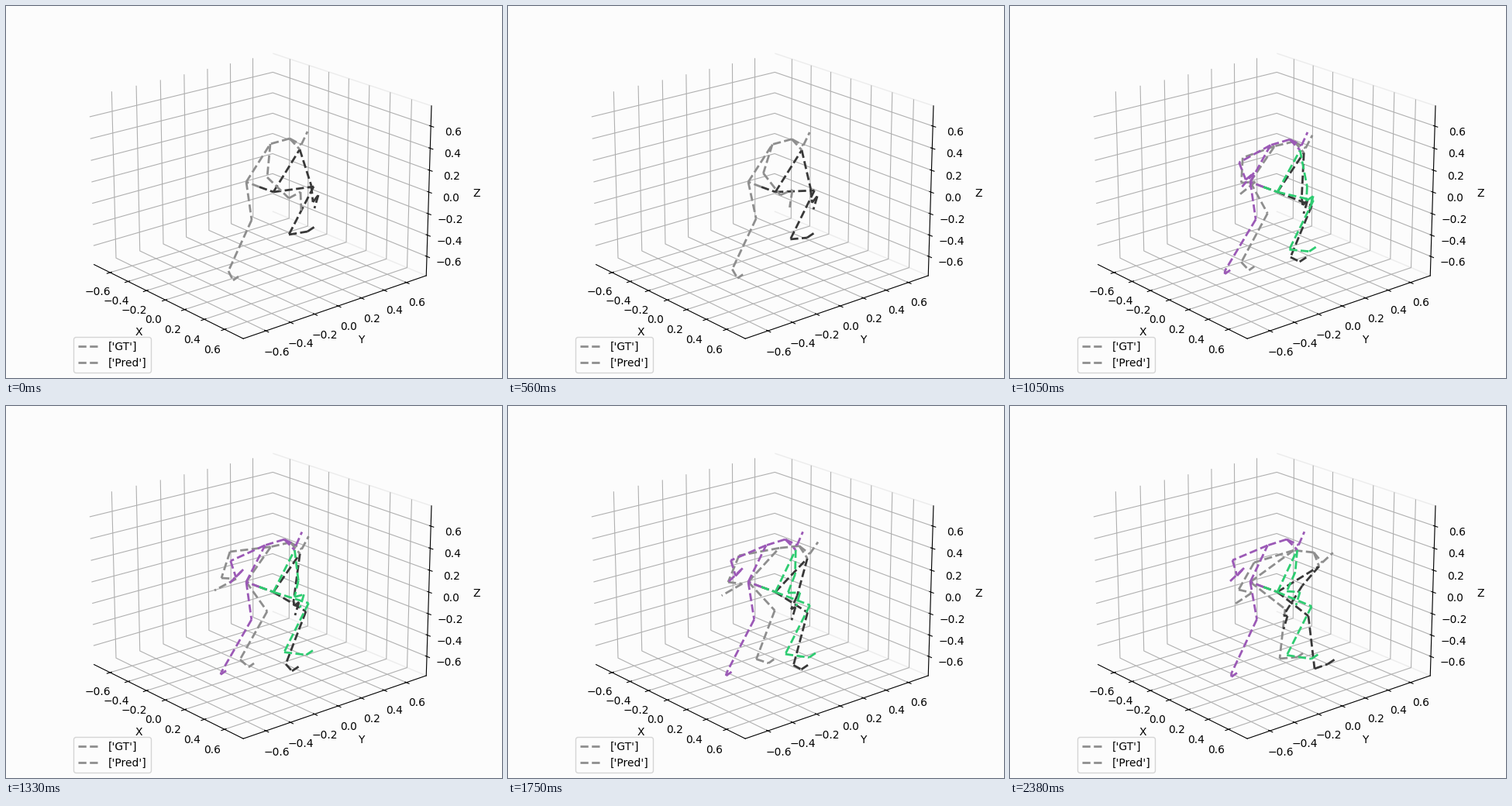
Animation, 640 px wide and 480 px high, one loop 2.45 s. Source, as a matplotlib script:

```python
import numpy as np
import matplotlib.pyplot as plt
from matplotlib.animation import FuncAnimation
from matplotlib.lines import Line2D

W, H, DPI = 640, 480, 100
FRAMES, STEP = 35, 70
PRED_START, MID, LAST = 10, 19, 34
PAPER = "#fcfcfc"
GT_COLORS = {"r": "#8e8e8e", "l": "#383838"}
PRED_COLORS = {"r": "#9b59b6", "l": "#2ecc71"}

plt.rcParams.update({"figure.facecolor": PAPER, "axes.facecolor": PAPER})

ROOT, RHIP, LHIP = np.array([(327, 233.5), (310, 227), (345, 240)])
# The trunk is rigid: offsets from the neck, turned by the lean.
CHIN, CROWN, LSHOULDER, RSHOULDER = np.array(
    [(15, 8), (23, -9), (13, 14), (-25, 7)])
# Rigid ends of the feet and of the left hand.
RTOE, LTOE, LTIP = np.array([(7, -5), (9, -6), (-5, 17)])


def make_pose(neck, lean, rleg, lleg, larm, rarm):
    """Legs run knee, ankle, foot; arms run elbow, wrist, thumb."""
    parts = dict(trunk=(*neck, lean), rleg=rleg, lleg=lleg, larm=larm, rarm=rarm)
    return {name: np.array(part, float) for name, part in parts.items()}


CROUCH = make_pose(
    neck=(366, 171), lean=0,
    rleg=[(317, 276), (287, 342), (293, 354)],
    lleg=[(397, 233), (365, 295), (389, 291)],
    larm=[(394, 232), (396, 253), (403, 244)],
    rarm=[(337, 221), (365, 248), (380, 240), (381, 264)])
STRIDE = make_pose(
    neck=(367, 176), lean=3,
    rleg=[(337, 265), (302, 327), (313, 337)],
    lleg=[(387, 265), (361, 333), (369, 342)],
    larm=[(371, 252), (372, 258), (378, 253)],
    rarm=[(289, 188), (278, 222), (297, 223), (269, 238)])
STOOP = make_pose(
    neck=(392, 189), lean=22,
    rleg=[(355, 262), (348, 326), (371, 324)],
    lleg=[(385, 271), (393, 339), (410, 333)],
    larm=[(377, 232), (353, 270), (358, 271)],
    rarm=[(315, 202), (295, 237), (312, 241), (288, 257)])
REST = make_pose(
    neck=(357, 172), lean=-2,
    rleg=[(319, 275), (287, 346), (288, 350)],
    lleg=[(389, 259), (357, 322), (389, 327)],
    larm=[(368, 214), (357, 239), (374, 240)],
    rarm=[(287, 199), (293, 219), (302, 209), (284, 226)])
KICK = np.array([(-3, 1), (-11, -2), (-14, -4)])

# How each part of the prediction settles: time constant and sharpness.
SETTLE = dict(trunk=(6, 1), rleg=(4, 1), lleg=(7, 1), larm=(10.5, 2), rarm=(3.5, 1))


def smooth(u):
    return u * u * (3 - 2 * u)


def blend(a, b, weight):
    return {part: a[part] + (b[part] - a[part]) * weight(part) for part in a}


def true_pose(t):
    if t < MID:
        k = smooth((t / MID) ** 1.6)
        return blend(CROUCH, STRIDE, lambda part: k)
    u = (t - MID) / (LAST - MID)
    pace = {"rleg": u, "lleg": u ** 1.6}
    return blend(STRIDE, STOOP, lambda part: pace.get(part, smooth(u)))


def predicted_pose(t):
    """Leave the true pose and settle into the rest pose, with a short kick."""
    age = t - PRED_START

    def weight(part):
        tau, power = SETTLE[part]
        return 1 - np.exp(-(age / tau) ** power)

    pose = blend(true_pose(PRED_START), REST, weight)
    pose["rleg"] += KICK * (age / 5.5) * np.exp(1 - age / 5.5)
    return pose


def bones(pose):
    """List every bone as (side, start, end) in drawing order."""
    neck, lean = pose["trunk"][:2], np.radians(pose["trunk"][2])
    c, s = np.cos(lean), np.sin(lean)
    turn = np.array([(c, s), (-s, c)])
    chin, crown, lsh, rsh = (neck + p @ turn
                             for p in (CHIN, CROWN, LSHOULDER, RSHOULDER))
    rleg, lleg, larm, rarm = (pose[p] for p in ("rleg", "lleg", "larm", "rarm"))
    chains = [
        ("r", [RHIP, *rleg, rleg[-1] + RTOE]),
        ("l", [LHIP, *lleg, lleg[-1] + LTOE]),
        ("r", [ROOT, RHIP]),
        ("l", [ROOT, LHIP]),
        ("l", [LHIP, lsh, *larm, larm[-1] + LTIP]),
        ("r", [RHIP, rsh, *rarm]),
        ("r", [neck, rsh]),
        ("r", [neck, lsh]),
        ("r", [neck, chin, crown]),
    ]
    return [(side, a, b) for side, chain in chains
            for a, b in zip(chain, chain[1:])]


def make_scene(fig):
    ax = fig.add_axes([0, 0, 1, 1], projection="3d")
    ax.view_init(elev=20, azim=-40)
    limit = 0.75 * 25 / 24
    ax.set(xlim=(-limit, limit), ylim=(-limit, limit), zlim=(-limit, limit),
           xlabel="X", ylabel="Y", zlabel="Z")
    for axis in (ax.xaxis, ax.yaxis, ax.zaxis):
        axis.set_ticks(np.arange(-3, 4) / 5)
        axis.set_pane_color((1, 1, 1, 0))
    wall = ax.yaxis.pane
    wall.set_alpha(None)
    wall.set_facecolor("none")
    wall.set_edgecolor("#ececec")
    handles = [Line2D([], [], color=GT_COLORS["r"], lw=2, ls="--", label=label)
               for label in ("['GT']", "['Pred']")]
    ax.legend(handles=handles, loc="lower left")


def make_skeleton(ax, colors):
    return [ax.plot([], [], lw=2, ls="--", color=colors[side])[0]
            for side, _, _ in bones(CROUCH)]


def place(lines, pose):
    for line, (_, start, end) in zip(lines, bones(pose)):
        line.set_data(*zip(start, end))


fig = plt.figure(figsize=(W / DPI, H / DPI), dpi=DPI)
make_scene(fig)
stage = fig.add_axes([0, 0, 1, 1], zorder=5)
stage.set(xlim=(0, W), ylim=(H, 0))
stage.axis("off")
gt_lines = make_skeleton(stage, GT_COLORS)
pred_lines = make_skeleton(stage, PRED_COLORS)


def draw(frame):
    place(gt_lines, true_pose(frame))
    predicted = frame >= PRED_START
    for line in pred_lines:
        line.set_visible(predicted)
    if predicted:
        place(pred_lines, predicted_pose(frame))
    return gt_lines + pred_lines


anim = FuncAnimation(fig, draw, frames=FRAMES, interval=STEP,
                     repeat=True, repeat_delay=0, blit=False)
plt.show()
```
